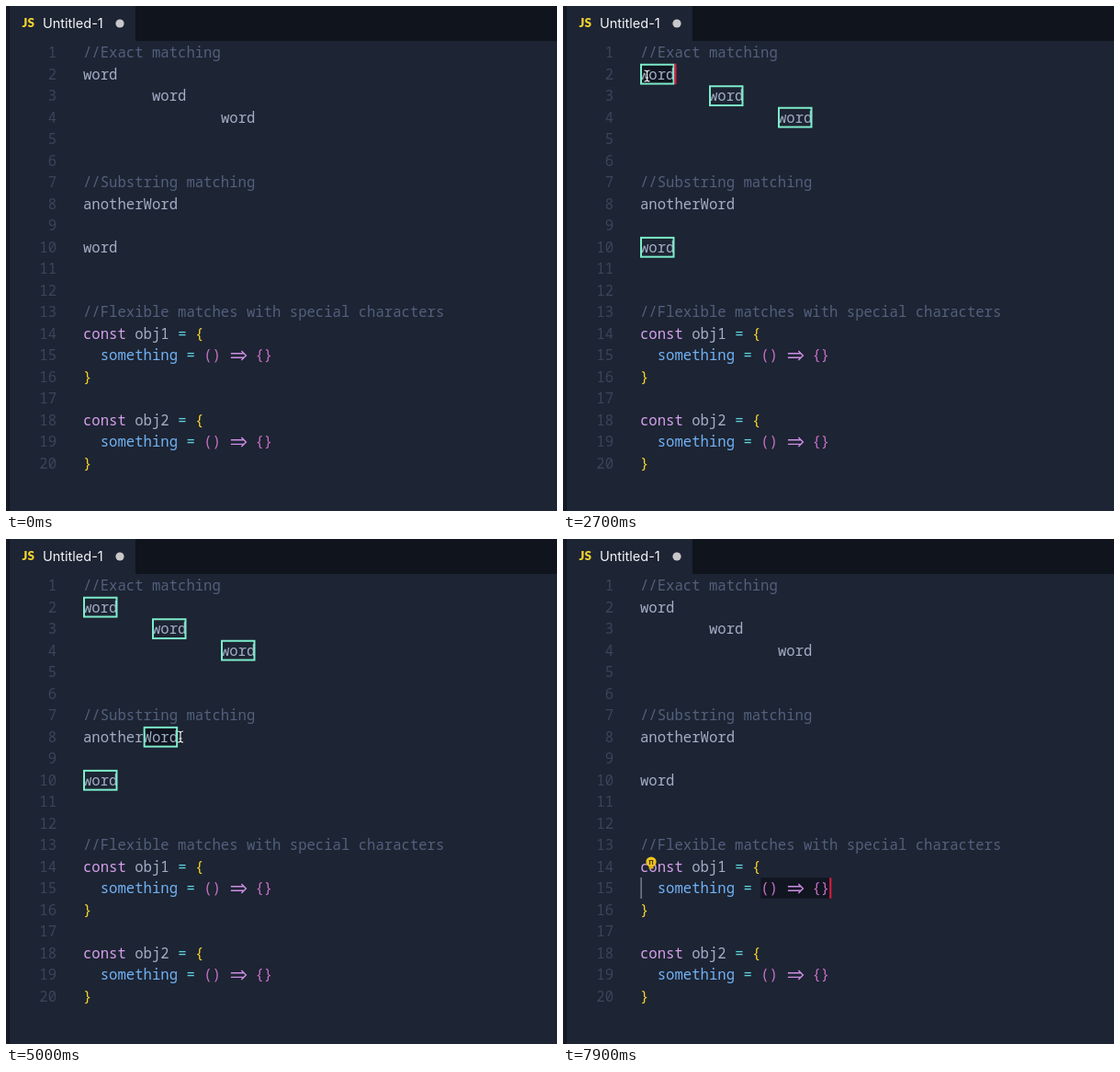
Animation, 600 px wide and 549 px high, one loop 8 s. Source, as an HTML page:

```html
<!DOCTYPE html>
<html lang="en">
<head>
<meta charset="utf-8">
<title>Matching selections in an editor</title>
<style>
  html, body { margin: 0; width: 100%; height: 100%; overflow: hidden; background: #1d2433; }
  svg { display: block; width: 600px; height: 549px; }
  text { white-space: pre; }
  .code { font: 15.625px "Noto Sans Mono", "DejaVu Sans Mono", monospace; }
  .num { fill: #3a455b; text-anchor: end; }
  .comment { fill: #52607d; }
  .plain { fill: #a3aec6; }
  .key { fill: #d5a0ec; }
  .op { fill: #5fd3e0; }
  .brace { fill: #f6d32d; }
  .prop { fill: #71b2f4; }
  .inner { fill: #c76fc6; }
  .arrow { fill: none; stroke: #cf8fe6; stroke-width: 1.4; }
  .box { fill: none; stroke: #7deccb; stroke-width: 2; }
  .sel { fill: #101520; }
  .pair { fill: #ee0b40; }
  .pair-line { fill: #e9dfe3; }
</style>
</head>
<body>
<svg viewBox="0 0 600 549">
  <rect width="600" height="549" fill="#1d2433"/>
  <rect width="600" height="38" fill="#10141c"/>
  <rect x="4" width="137" height="39" fill="#1d2433"/>
  <rect width="3" height="549" fill="#151a26"/>
  <rect x="3" width="1" height="549" fill="#10141d"/>
  <text x="17.5" y="23" fill="#f2d32e" font-family="Lato, sans-serif" font-weight="900" font-size="13.5">JS</text>
  <text x="40" y="24" fill="#f4f5f7" font-family="Inter, sans-serif" font-size="14.5">Untitled-1</text>
  <circle cx="124" cy="19" r="4.6" fill="#c8c8cb"/>
  <g id="under"></g>
  <g id="code" class="code"></g>
  <g id="over"></g>
  <rect id="guide" x="84.5" y="368" width="1.2" height="23" fill="#8c96aa"/>
  <g id="bulb">
    <circle cx="96" cy="351" r="5.6" fill="#efc51d"/>
    <path d="M93.6 349.5h4.8M94.5 350v4M97.5 350v4" stroke="#473b12" stroke-width="1.2"/>
    <rect x="93.5" y="355.5" width="5" height="3" fill="#d9b320"/>
  </g>
  <rect id="caret" width="2" height="22.5" fill="#e5173f"/>
  <g id="mouse">
    <g id="rings" fill="none">
      <circle r="11.2" stroke="#11151e" stroke-width="4"/>
      <circle r="13" stroke="#eceef1" stroke-width="1.1"/>
      <circle r="9.8" stroke="#eceef1" stroke-width="1.1"/>
    </g>
    <path id="beamEdge" d="M-3-6Q0-6 0-4Q0-6 3-6M0-4V4M-3 6Q0 6 0 4Q0 6 3 6M-1.5 2h3" fill="none" stroke="#10141c" stroke-width="3"/>
    <path d="M-3-6Q0-6 0-4Q0-6 3-6M0-4V4M-3 6Q0 6 0 4Q0 6 3 6M-1.5 2h3" fill="none" stroke="#f3f4f6" stroke-width="1.2"/>
  </g>
</svg>
<script>
const LOOP = 8000, STEP = 100, BLINK = 500;
const LEFT = 84, CHAR = 9.375, PITCH = 23.52;
const $ = id => document.getElementById(id);
const colX = col => LEFT + col * CHAR;
const rowY = row => 50 + (row - 1) * PITCH;

function add(parent, name, attrs, text) {
  const el = document.createElementNS('http://www.w3.org/2000/svg', name);
  for (const key in attrs) el.setAttribute(key, attrs[key]);
  if (text) el.textContent = text;
  parent.append(el);
  return el;
}

function write(row, col, cls, text) {
  add($('code'), 'text', { x: colX(col), y: rowY(row) + 6, class: cls }, text);
}

function writeObject(row, name) {
  write(row, 0, 'key', 'const');
  write(row, 6, 'plain', name);
  write(row, 11, 'op', '=');
  write(row, 13, 'brace', '{');
  write(row + 1, 2, 'prop', 'something');
  write(row + 1, 12, 'op', '=');
  write(row + 1, 14, 'inner', '()');
  const x = colX(17) + 1.5, y = rowY(row + 1) + 0.7;
  add($('code'), 'path', { class: 'arrow', d: `M${x} ${y - 2.3}h14M${x} ${y + 2.3}h14M${x + 11.5} ${y - 5}l5 5l-5 5` });
  write(row + 1, 20, 'inner', '{}');
  write(row + 2, 0, 'brace', '}');
}

for (let row = 1; row <= 20; row++) {
  add($('code'), 'text', { x: 55, y: rowY(row) + 6, class: 'num' }, String(row));
}
write(1, 0, 'comment', '//Exact matching');
write(7, 0, 'comment', '//Substring matching');
write(13, 0, 'comment', '//Flexible matches with special characters');
const words = [[2, 0], [3, 8], [4, 16], [10, 0]];
words.forEach(([row, col]) => write(row, col, 'plain', 'word'));
write(8, 0, 'plain', 'anotherWord');
writeObject(14, 'obj1');
writeObject(18, 'obj2');

// Parts shown only while their test of the time holds.
const shown = [];
const during = (el, test) => shown.push([el, test]);
const between = (a, b) => t => t >= a && t < b;

function band(row, col, len, cls, test) {
  during(add($('under'), 'rect', {
    x: colX(col), y: rowY(row) - 11, width: len * CHAR, height: 22.5, class: cls
  }), test);
}
function frame(row, col, test) {
  during(add($('over'), 'rect', {
    x: colX(col) + 1, y: rowY(row) - 9.8, width: 4 * CHAR - 2, height: 20.8, class: 'box'
  }), test);
}
function bracket(row, col, test) {
  band(row, col, 1, 'pair', test);
  during(add($('under'), 'rect', {
    x: colX(col), y: rowY(row) + 10.5, width: CHAR, height: 1.2, class: 'pair-line'
  }), test);
}

const firstPick = between(1300, 3500), secondPick = between(4400, 6200);
const anyPick = t => firstPick(t) || secondPick(t);
band(2, 0, 4, 'sel', firstPick);
words.forEach(([row, col]) => frame(row, col, anyPick));
for (let n = 1; n <= 4; n++) {
  band(8, 7, n, 'sel', n < 4 ? between(3700 + n * 175, 3875 + n * 175) : secondPick);
}
frame(8, 7, secondPick);

const onObject = between(6500, 7300);
bracket(14, 13, onObject);
bracket(16, 0, onObject);
const onLineEnd = between(7300, 7500), onParens = between(7500, 7700);
bracket(15, 20, onLineEnd);
bracket(15, 21, onLineEnd);
bracket(15, 14, onParens);
bracket(15, 15, onParens);
band(15, 14, 8, 'sel', between(7700, LOOP));

during($('guide'), between(7300, LOOP));
during($('bulb'), between(7800, LOOP));
during($('mouse'), between(700, 7300));
during($('rings'), t => between(1200, 1500)(t) || between(3500, 4500)(t) || between(6200, 6400)(t));

// time, row, column
const carets = [
  [1200, 2, 1], [1300, 2, 4], [3500, 8, 7], [3875, 8, 8], [4050, 8, 9], [4225, 8, 10],
  [4400, 8, 11], [6200, 14, 6], [6500, 14, 14], [7300, 15, 22], [7500, 15, 14], [7700, 15, 22]
];
// time, x, y
const path = [
  [700, 330, 560], [1100, 91.5, 76], [2700, 91.5, 76], [3400, 150, 215], [3700, 150, 215],
  [4400, 190, 215], [5200, 190, 215], [5800, 144, 359], [LOOP, 144, 359]
];

function mouseAt(t) {
  const i = Math.max(1, path.findIndex(p => p[0] > t));
  const [t0, x0, y0] = path[i - 1], [t1, x1, y1] = path[i];
  const k = Math.min(1, Math.max(0, (t - t0) / (t1 - t0)));
  const e = k * k * (3 - 2 * k);
  return [x0 + (x1 - x0) * e, y0 + (y1 - y0) * e];
}

function draw(t) {
  for (const [el, test] of shown) el.style.display = test(t) ? '' : 'none';
  $('mouse').setAttribute('transform', `translate(${mouseAt(t)})`);
  const spot = carets.filter(c => c[0] <= t).pop();
  const lit = spot && Math.floor((t - spot[0]) / BLINK) % 2 === 0;
  $('caret').style.display = lit ? '' : 'none';
  if (lit) {
    $('caret').setAttribute('x', colX(spot[2]));
    $('caret').setAttribute('y', rowY(spot[1]) - 11);
  }
}

const start = performance.now();
function tick() {
  const t = (performance.now() - start) % LOOP;
  draw(Math.floor(t / STEP) * STEP);
  requestAnimationFrame(tick);
}
tick();
</script>
</body>
</html>
```
